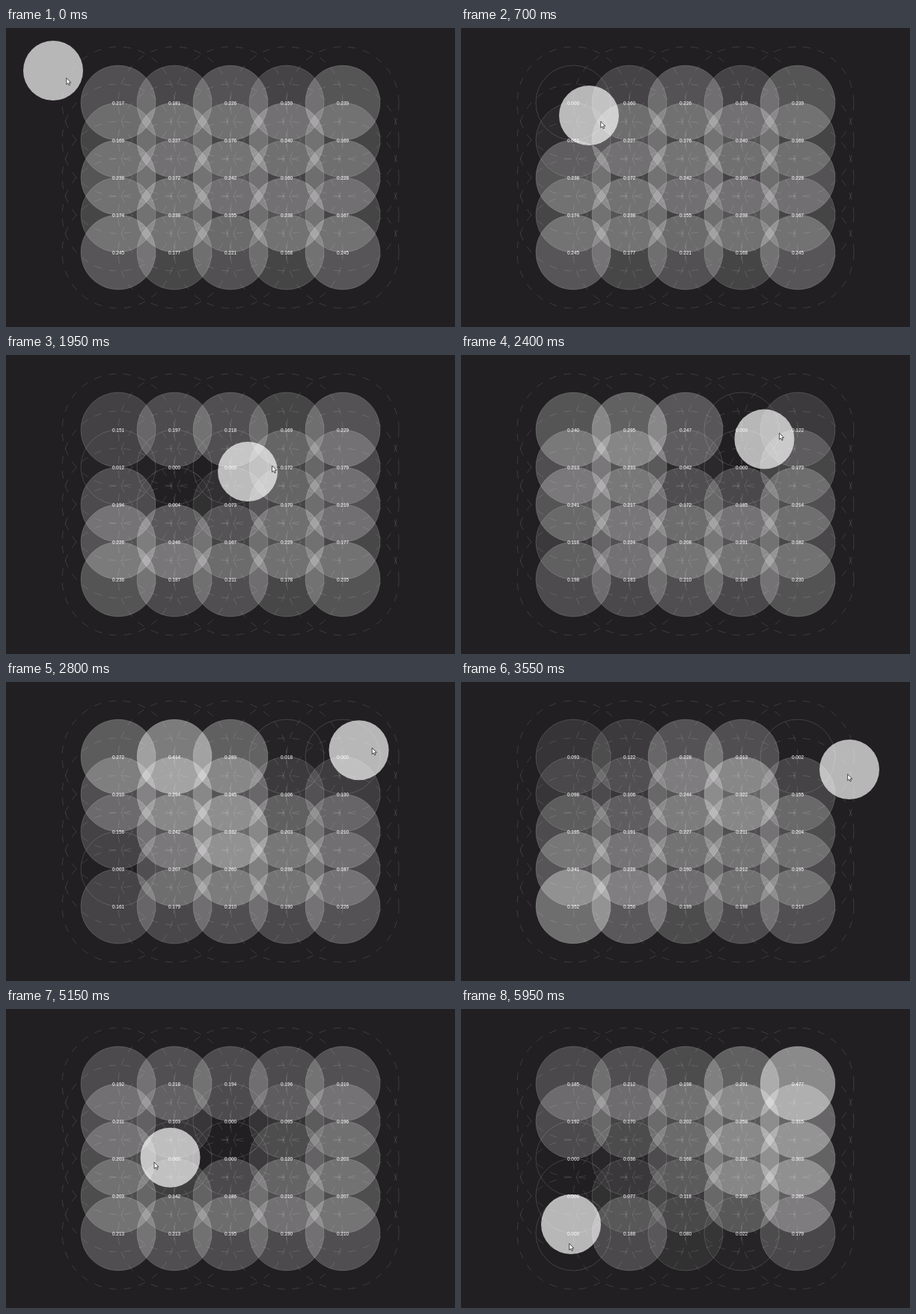
Recreate the animation shown at these times as an HTML page with a canvas. Size 600 by 400 pixels, loop 6 s.

```html
<!DOCTYPE html>
<html>
<head>
<meta charset="utf-8">
<style>
html, body { margin: 0; width: 600px; height: 400px; overflow: hidden; background: #211f21; }
canvas { display: block; }
</style>
</head>
<body>
<canvas id="stage" width="600" height="400"></canvas>
<script>
const ctx = document.getElementById('stage').getContext('2d');
const LOOP = 6000, STEP = 50, SETTLED = 5850, POINTER_LEAD = 115;
const clamp = v => Math.max(0, Math.min(1, v));
const white = a => `rgba(255,255,255,${a})`;

// Key points of the disc: time, x, y
const path = [
  [0, 63, 57], [700, 171, 117], [1000, 200, 126], [1300, 157, 124],
  [1600, 190, 168], [1950, 323, 156], [2300, 388, 120], [2800, 471.5, 91.3],
  [3250, 534, 93], [3550, 519, 117], [3900, 521, 128], [4450, 405, 159],
  [5000, 250, 190], [5600, 152, 232], [5850, 147, 288]
];

// Swells and dips of the field: time, column, row, strength
const swells = [
  [1950, 0, 2, 0.13],
  [2800, 1, 0, 0.22], [2800, 1.7, 2.4, 0.14], [2800, 0, 3, -0.2],
  [3550, 0.5, 0.5, -0.17], [3550, 3, 0.6, 0.17], [3550, 4, 0, -0.25], [3550, 0, 4, 0.14],
  [4450, 0.3, 0.7, 0.15], [4450, 4, 0.6, -0.2], [4450, 2, 4, 0.18],
  [SETTLED, 4, 0, 0.27], [SETTLED, 3.5, 2.5, 0.17], [SETTLED, 1, 2.4, -0.17], [SETTLED, 2.8, 4, -0.2]
];

// Small fixed irregularity per cell
let seed = 7;
const random = () => (seed = seed * 16807 % 2147483647) / 2147483647;
const cells = Array.from({ length: 25 }, (_, i) => {
  const col = i % 5, row = Math.floor(i / 5);
  return { col, row, x: 150 + 75 * col, y: 100 + 50 * row, jitter: (random() - 0.5) * 0.03 };
});

// Smooth curve through the path points
function track(t, axis) {
  const last = path.length - 1;
  let i = 0;
  while (i < last - 1 && path[i + 1][0] <= t) i++;
  const slope = k => {
    const a = path[Math.max(0, k - 1)], b = path[Math.min(last, k + 1)];
    return (b[axis] - a[axis]) / (b[0] - a[0]);
  };
  const p = path[i], q = path[i + 1], h = q[0] - p[0], u = (t - p[0]) / h;
  return p[axis] + (q[axis] - p[axis]) * u * u * (3 - 2 * u)
    + h * u * (1 - u) * ((1 - u) * slope(i) - u * slope(i + 1));
}

// The disc follows the pointer, so the pointer leads along the velocity
function pointerAt(t, axis) {
  const speed = (track(t + 1, axis) - track(t - 1, axis)) / 2;
  return track(t, axis) + speed * POINTER_LEAD;
}

// The disc empties the cells it passes, which then refill
function drain(cell, t) {
  let most = 0;
  for (let lag = 0; lag <= Math.min(t, 650); lag += STEP) {
    const d = Math.hypot(track(t - lag, 1) - cell.x, track(t - lag, 2) - cell.y);
    most = Math.max(most, clamp((60 - d) / 30) * clamp((650 - lag) / 250));
  }
  return t ? most : 0;
}

function levelAt(cell, t) {
  const { col, row, jitter } = cell;
  const checker = (col + row) % 2 ? -0.032 : 0.032;
  let level = 0.2 + jitter + checker * clamp(1.4 - t / 2800);
  for (const [time, c, r, strength] of swells) {
    const near = (col - c) ** 2 + (row - r) ** 2 + ((t - time) / 450) ** 2;
    level += strength * Math.exp(-near);
  }
  return Math.max(0, level) * (1 - drain(cell, t));
}

function circle(x, y, r) {
  ctx.beginPath();
  ctx.arc(x, y, r, 0, Math.PI * 2);
}

function drawPointer(x, y) {
  const shape = [[0, 0], [0, 8.6], [2, 6.8], [3.4, 9.8], [4.8, 9.2], [3.5, 6.3], [6, 6.2]];
  ctx.beginPath();
  shape.forEach(([dx, dy]) => ctx.lineTo(x + dx, y + dy));
  ctx.closePath();
  ctx.fillStyle = '#fff';
  ctx.fill();
  ctx.strokeStyle = '#222';
  ctx.lineWidth = 0.8;
  ctx.stroke();
}

function draw(t) {
  ctx.fillStyle = '#211f21';
  ctx.fillRect(0, 0, 600, 400);

  const levels = cells.map(cell => levelAt(cell, t));
  ctx.lineWidth = 0.5;
  cells.forEach(({ x, y }, i) => {
    circle(x, y, 50);
    ctx.fillStyle = white(levels[i]);
    ctx.fill();
    ctx.strokeStyle = white(0.3);
    ctx.stroke();
    circle(x, y, 75);
    ctx.setLineDash([10, 10]);
    ctx.strokeStyle = white(0.26);
    ctx.stroke();
    ctx.setLineDash([]);
  });

  ctx.font = '6.4px "Liberation Sans", Arial, sans-serif';
  ctx.textAlign = 'center';
  ctx.fillStyle = '#fff';
  cells.forEach(({ x, y }, i) => ctx.fillText(levels[i].toFixed(3), x, y + 3.2));

  circle(track(t, 1), track(t, 2), 40);
  ctx.fillStyle = white(0.68);
  ctx.fill();
  drawPointer(pointerAt(t, 1), pointerAt(t, 2));
}

const start = performance.now();
function frame() {
  const t = (performance.now() - start) % LOOP;
  draw(Math.min(SETTLED, Math.floor(t / STEP) * STEP));
  requestAnimationFrame(frame);
}
frame();
</script>
</body>
</html>
```
